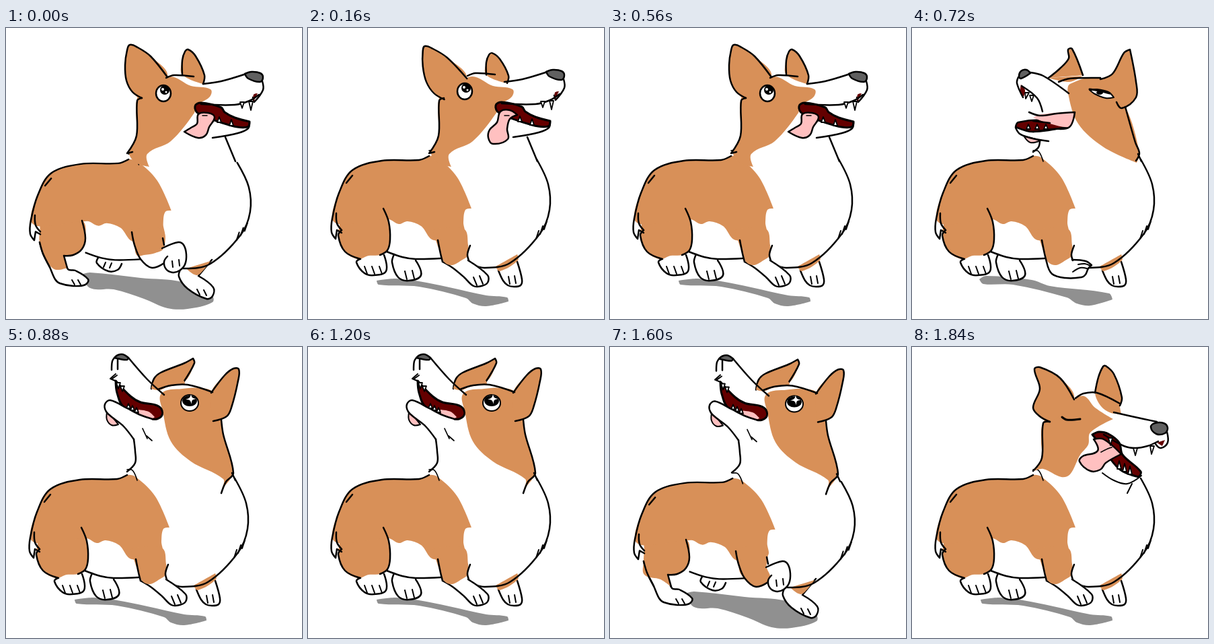
An HTML page with a canvas that plays this animation: 440x432 px, repeating every 1920 ms.

```html
<!DOCTYPE html>
<html lang="en">
<head>
<meta charset="utf-8">
<title>Trotting corgi</title>
<style>
html, body { margin: 0; width: 100%; height: 100%; overflow: hidden; background: #fff; }
canvas { display: block; }
</style>
</head>
<body>
<canvas id="stage" width="440" height="432"></canvas>
<script>
const ctx = document.getElementById('stage').getContext('2d');
const TAN = '#d89058', GREY = '#909090', RED = '#640000', PINK = '#ffc0c0', NOSE = '#606060';
const STEP = 80, STEPS = 24;

// Smooth curve through "x,y x,y" key points; sharp turns stay corners, ';' starts a new run.
function trace(text, closed) {
  const path = new Path2D();
  for (const run of text.split(';')) {
    const pts = run.trim().split(/\s+/).map(p => p.split(',').map(Number));
    const n = pts.length;
    const at = i => closed ? pts[(i + n) % n] : pts[Math.max(0, Math.min(n - 1, i))];
    const heading = i => {
      const [a, b, c] = [at(i - 1), at(i), at(i + 1)];
      const turn = (b[0] - a[0]) * (c[0] - b[0]) + (b[1] - a[1]) * (c[1] - b[1]);
      const len = Math.hypot(c[0] - a[0], c[1] - a[1]);
      return turn > 0 ? [(c[0] - a[0]) / len, (c[1] - a[1]) / len] : [0, 0];
    };
    path.moveTo(...pts[0]);
    for (let i = 0; i < (closed ? n : n - 1); i++) {
      const a = at(i), b = at(i + 1), u = heading(i), v = heading(i + 1);
      const k = Math.hypot(b[0] - a[0], b[1] - a[1]) / 3;
      path.bezierCurveTo(a[0] + u[0] * k, a[1] + u[1] * k, b[0] - v[0] * k, b[1] - v[1] * k, ...b);
    }
    if (closed) path.closePath();
  }
  return path;
}

function fill(color, text) {
  ctx.fillStyle = color;
  ctx.fill(trace(text, true));
}

function ink(text, width = 2.5, closed = false) {
  ctx.lineWidth = width;
  ctx.stroke(trace(text, closed));
}

function blob(color, text, width = 2.5) {
  fill(color, text);
  ink(text, width, true);
}

// A filled part whose outline stays open at the joint.
function limb(text, color = '#fff') {
  fill(color, text);
  ink(text);
}

function oval(color, x, y, rx, ry, outline) {
  ctx.beginPath();
  ctx.ellipse(x, y, rx, ry, 0, 0, 7);
  ctx.fillStyle = color;
  ctx.fill();
  ctx.lineWidth = outline;
  if (outline) ctx.stroke();
}

function moved(matrix, paint) {
  ctx.save();
  ctx.transform(...matrix);
  paint();
  ctx.restore();
}

const shifted = (x, y, paint) => moved([1, 0, 0, 1, x, y], paint);

// Parallel short lines: toes and tufts of fur.
function hairs(count, x, y, gapX, gapY, dx, dy) {
  for (let i = 0; i < count; i++, x += gapX, y += gapY) ink(`${x},${y} ${x + dx},${y + dy}`, 2);
}

// Negative height points up.
function fang(x, y, height, lean = 0) {
  blob('#fff', `${x - 3},${y} ${x + lean},${y + height} ${x + 3},${y}`, 1.8);
}

function torso() {
  const back = '180,190 165,196 110,197 66,211 46,245 36,283';
  fill(TAN, back + ' 50,292 119,284 135,291 148,287 168,294 187,315 231,308 231,288 234,270 243,268 222,222 193,193');
  ink(back + ' 35,303 41,313 43,300 50,304;66,219 57,230;42,275 43,290 50,300');
  ink('340,195 357,232 359,270 345,305 300,349 262,356 244,350');
  ink('117,332 140,340 160,343 197,342');
  hairs(3, 355, 287, -6, 7, -4, 12);
  ink('180,182 188,183 195,198', 1.7);
}

function lowBody(left) {
  const sock = left ? 343 : 357;
  const cuff = left ? '217,356 238,346 233,327' : '205,337 222,334 235,326';
  const thigh = '91,356 86,338 100,337 113,328 118,312 113,286';
  const farLeg = '260,357 257,369 270,387 298,402 307,398 308,385 286,368 306,344';
  fill(GREY, '112,366 125,363 200,371 262,377 306,397 307,407 270,417 240,416 205,402 160,388 125,386');
  limb(farLeg);
  fill(TAN, '268,357 283,367 293,360 304,346');
  hairs(2, 284, 388, 10, 1, 4, 8);
  limb('137,341 135,349 152,361 166,359 172,350');
  hairs(2, 148, 348, 9, 1, -3, 7);
  limb('50,318 55,335 65,355 73,373 80,379 100,383 118,381 122,373 103,360 92,358 86,338');
  fill(TAN, `40,275 50,292 50,318 ${sock - 292},${sock - 5} 75,${sock + 2} ${thigh}`);
  moved([1.009, 0, 0, .976, .6, 9.6], torso);
  fill(TAN, `185,300 191,325 195,338 ${cuff} 231,298`);
  ink('50,318 55,335 65,355;' + thigh);
  hairs(2, 98, 374, 9, 0, 4, 7);
  ink('187,303 191,322 200,343 217,356 238,347;233,312 235,322');
  limb('232,327 256,318 264,322 268,336 266,351 258,360 248,363 238,358 235,347 240,339');
  hairs(2, 247, 346, 10, -2, 1, 9);
}

function highBody(reach) {
  const thigh = '107,337 118,330 122,314 120,288 112,268';
  fill(GREY, reach
    ? '100,373 110,368 178,374 205,383 293,394 298,403 265,412 245,409 230,400 150,381 106,380'
    : '102,375 130,372 165,376 210,385 265,397 296,400 298,406 265,413 245,409 235,401 165,384 105,381');
  limb('283,360 290,375 297,382 306,384 316,382 318,373 311,347');
  fill(TAN, '279,354 311,336 312,345 285,361');
  hairs(2, 298, 369, 9, -1, 2, 11);
  limb('128,336 125,348 134,370 150,375 168,367 160,345');
  hairs(2, 144, 361, 11, -1, 3, 12);
  limb('77,343 72,348 84,364 98,367 116,361 113,337');
  fill(TAN, `40,275 47,290 45,305 55,332 74,343 90,338 ${thigh}`);
  torso();
  hairs(3, 84, 354, 11, 0, 4, 11);
  ink('50,300 45,308 55,332 78,343;' + thigh);
  limb(reach
    ? '200,347 208,365 228,371 252,370 258,366 262,357 267,352 258,346 238,344'
    : '200,347 215,356 232,370 246,383 258,383 267,378 267,367 238,345');
  fill(TAN, '185,300 197,335 203,348 214,352 228,345 237,338 238,322 231,298');
  ink('193,315 197,335 200,347;241,323 237,336 239,345');
  if (reach) ink('239,362 250,356 260,357;247,351 257,350 265,353', 2);
  else hairs(2, 246, 370, 9, -2, 5, 12);
}

function headRight(flop) {
  const bob = flop ? 1 : 0;
  fill(TAN, '195,104 194,160 183,185 193,200 213,206 210,187 245,168 280,126 282,116 303,102 304,91 275,86 243,72 215,90');
  moved([1, 0, .14 * bob, 1, -14 * bob, 2 * bob], () =>
    limb('202,104 188,95 179,78 177,55 180,33 184,25 196,29 215,42 240,73', TAN));
  moved([1, 0, 0, 1 - .12 * bob, 3 * bob, 9 * bob], () =>
    limb('262,69 262,48 266,35 271,32 282,42 295,70 293,83', TAN));
  ink('202,104 195,108 194,160 180,186 188,184;326,162 341,198');
  shifted(-bob, -3 * bob, () => {
    ink('238,74 250,70 279,72;293,83 320,79 357,68');
    blob(NOSE, '355,68 365,65 378,67 382,73 378,80 360,75');
    ink('381,79 382,92 369,110 367,103');
    fill(RED, '368,99 374,97 368,109');
    oval('#fff', 234, 97, 11, 12, 2.5);
    oval('#000', 236, 92, 7, 7);
    oval('#fff', 233, 91, 2, 2);
    oval('#fff', 238, 95, 1.5, 1.5);
  });
  shifted(-2 * bob, -bob, () => {
    blob(RED, '281,116 290,111 320,118 325,125 340,133 362,139 359,147 335,145 286,127', 3);
    ink('376,99 362,108 340,114 290,113;362,140 360,149 345,156 307,163');
    fang(351, 110, 9);
    fang(364, 109, 13);
    fang(317, 140, -8);
    fang(335, 145, -9);
  });
  blob(PINK, flop
    ? '286,124 300,122 311,129 300,135 296,150 297,165 275,172 268,163 270,151 281,140'
    : '286,128 300,126 310,132 302,147 297,159 285,163 265,154 275,148 284,142');
  ink('292,130 299,130', 1.5);
}

function headBlink() {
  const farEar = '272,68 277,45 284,29 288,28 300,40 312,75 309,87';
  fill(TAN, '195,112 192,140 193,165 182,184 195,181 222,193 235,189 250,160 262,145 265,127 299,107 272,90 256,73 240,78 215,95');
  fill(TAN, farEar + ' 311,99 296,98 281,88');
  limb('205,111 190,103 180,90 190,62 182,33 190,30 220,46 241,78', TAN);
  ink(farEar + ';243,76 255,69 275,68 309,84;205,111 195,113 193,165 180,184');
  ink('300,97 345,107 364,111;379,126 380,142 370,150 362,144');
  blob(NOSE, '355,119 361,113 374,113 380,120 376,128 363,129');
  fill(RED, '364,142 376,138 372,147');
  blob(RED, '268,130 278,126 292,129 308,142 313,160 340,185 337,193 308,181 280,145', 3);
  ink('366,140 350,147 332,150 315,147 285,130');
  blob(PINK, '270,137 285,137 311,159 288,172 280,182 265,184 249,170 254,162 276,154');
  ink('281,156 291,151 297,149', 1.7);
  fang(332, 150, 11);
  fang(357, 147, 12, -1);
  fang(295, 135, 11);
  for (let i = 0; i < 3; i++) fang(308 + 8 * i, 181 + 4 * i, -12);
  ink('283,187 300,198 320,203 341,191;327,203 320,217', 2);
  ink('223,104 230,108 250,107', 3);
}

function headTurn() {
  fill(TAN, '235,83 232,97 247,142 285,177 334,200 338,185 317,117 280,75');
  limb('203,74 220,60 233,45 232,32 238,31 254,70', TAN);
  fill(TAN, '203,74 254,71 234,80');
  limb('280,76 298,68 315,37 324,32 333,80 333,103 312,119 304,110', TAN);
  ink('218,80 235,75 280,74;317,117 332,170 338,186 333,197;336,187 341,198;176,66 195,71 233,97');
  blob(NOSE, '159,72 162,64 170,62 176,67 162,75');
  fill(RED, '162,84 168,92 166,102 161,94');
  ink('158,73 156,82 165,103;163,86 186,104 194,124');
  fang(171, 96, 9, -2);
  fang(178, 100, 9);
  blob(RED, '154,147 158,140 200,137 234,146 180,154');
  fill(PINK, '180,133 192,128 240,124 240,138 234,147 205,142');
  ink('174,125 190,130 215,127 242,125 234,147 210,150 180,154;180,138 205,141');
  for (let x = 173; x < 200; x += 13) fang(x, 150, -7);
  blob(PINK, '166,160 191,167 176,170', 2);
  ink('154,148 160,157 175,163 203,168;190,168 188,177 180,184');
  blob('#fff', '264,92 275,91 292,95 300,103 288,104 272,98', 2);
  oval('#000', 279, 96, 5, 3);
  ink('264,91 278,93 294,97', 3);
}

function headLeft() {
  fill(TAN, '231,69 233,95 245,140 275,170 323,196 321,210 337,187 324,135 308,68 290,61 262,62');
  limb('216,62 220,47 230,38 265,24 278,17 280,24 264,52', TAN);
  fill(TAN, '216,62 222,50 264,50 266,56 245,57 228,64');
  limb('305,68 325,42 338,32 346,33 345,50 335,90 328,103 308,110', TAN);
  ink('226,63 245,57 270,56 307,67;320,108 323,130 338,187 327,200 320,217;336,187 341,198');
  blob(NOSE, '161,16 166,12 174,11 182,16 180,19 170,18');
  ink('162,15 158,21 157,34;166,19 166,33;182,16 210,48 235,71');
  ink('163,40 155,47 162,50;158,47 165,42', 2);
  blob(RED, '163,50 185,73 200,82 222,86 231,92 231,103 218,107 175,89 165,68', 3);
  fill(PINK, '197,93 212,96 221,104 214,107 198,99');
  fang(167, 53, 9);
  fang(173, 58, 8);
  for (let i = 0; i < 3; i++) fang(182 + 6 * i, 91 + 3 * i, -7);
  blob(PINK, '150,97 150,108 157,116 167,115 158,104', 2);
  limb('218,107 200,101 180,91 155,79 147,85 149,96 160,106 175,118 190,137');
  ink('190,137 192,155 192,172 180,185');
  ink('203,121 210,136;209,132 217,139', 1.7);
  oval('#fff', 273, 83, 13, 12, 2);
  oval('#000', 273, 80, 11, 8);
  fill('#fff', '275,70 277,75 283,77 277,79 276,85 273,79 267,78 273,75');
}

function draw(step) {
  const phase = step % 4, left = step > 8 && step < 23;
  ctx.fillStyle = '#fff';
  ctx.fillRect(0, 0, 440, 432);
  ctx.strokeStyle = '#000';
  ctx.lineCap = ctx.lineJoin = 'round';
  if (phase) highBody(phase === 1); else lowBody(left);
  if (step < 8) headRight(phase === 1 || phase === 2);
  else if (step === 8 || step === 23) headBlink();
  else if (step === 9 || step === 22) headTurn();
  else shifted(phase ? 0 : 1, phase ? 0 : 1.5, headLeft);
}

let start, shown;
function tick(now) {
  start ??= now;
  const step = Math.floor((now - start) / STEP) % STEPS;
  if (step !== shown) draw(shown = step);
  requestAnimationFrame(tick);
}
draw(0);
requestAnimationFrame(tick);
</script>
</body>
</html>
```
